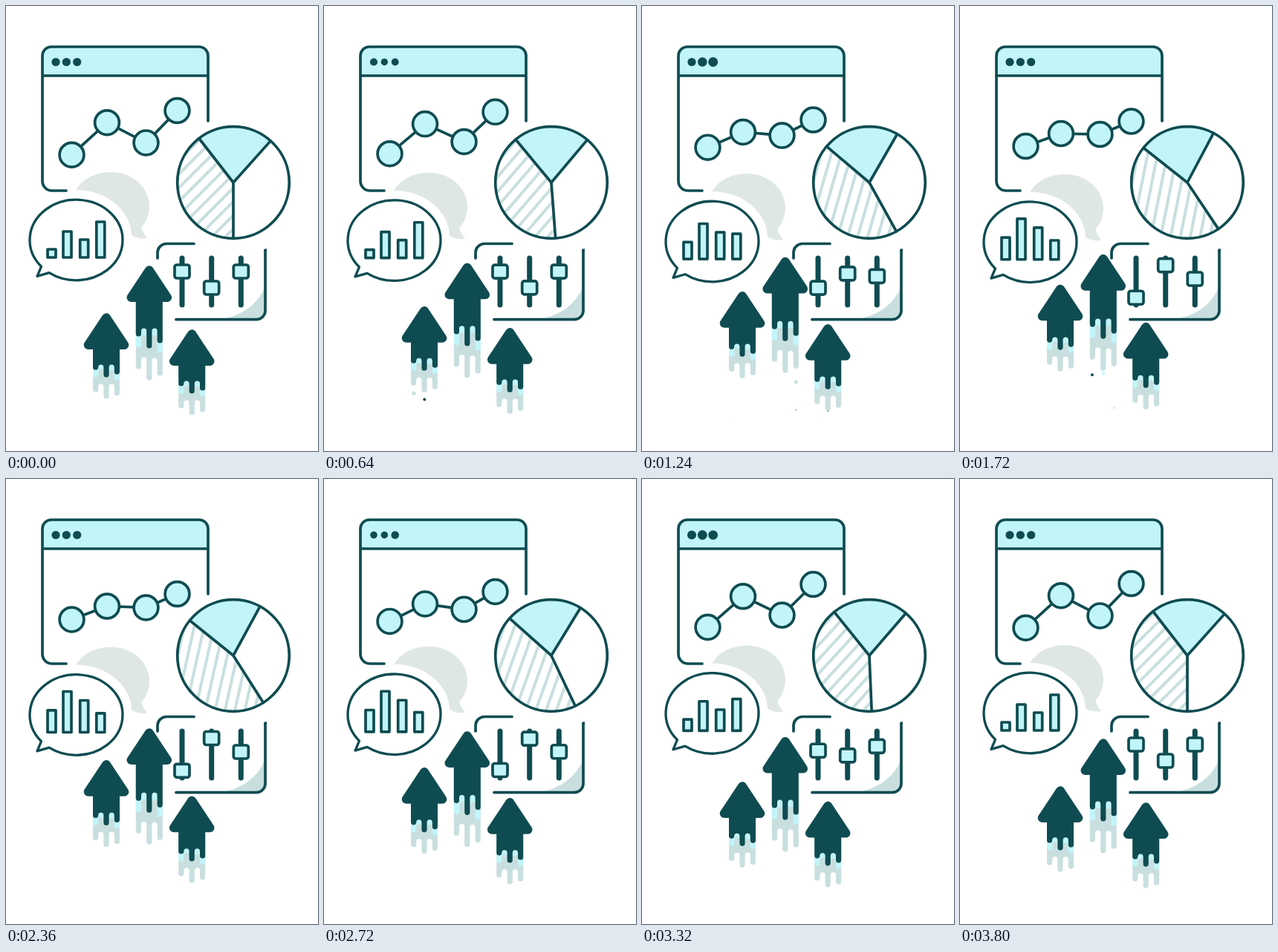
An HTML page with a canvas that plays this animation: 420x600 px, repeating every 3840 ms.

```html
<!DOCTYPE html>
<html lang="en">
<head>
<meta charset="utf-8">
<style>
  html, body { margin: 0; width: 100%; height: 100%; overflow: hidden; background: #fff; }
  canvas { display: block; }
</style>
</head>
<body>
<canvas id="stage" width="420" height="600"></canvas>
<script>
const ctx = document.getElementById('stage').getContext('2d');
const LOOP = 3840, RAD = Math.PI / 180;
const DARK = '#0f4c51', CYAN = '#c2f5fa', PALE = '#c9dfdf', GHOST = '#dfe7e6', WHITE = '#fff';

const mix = (a, b, k) => a + (b - a) * k;
const clamp = v => Math.min(1, Math.max(0, v));

// Symmetric cubic-bezier(a, 0, 1 - a, 1)
function ease(x, a) {
  let lo = 0, hi = 1, s = 0.5;
  for (let i = 0; i < 20; i++) {
    s = (lo + hi) / 2;
    const bx = 3 * a * s * (1 - s) ** 2 + 3 * (1 - a) * s * s * (1 - s) + s ** 3;
    if (bx < x) lo = s; else hi = s;
  }
  return s * s * (3 - 2 * s);
}

function paint(path, fill, stroke, width = 3.7) {
  if (fill) { ctx.fillStyle = fill; ctx.fill(path); }
  if (stroke) { ctx.strokeStyle = stroke; ctx.lineWidth = width; ctx.stroke(path); }
}
const draw = (d, fill, stroke, width) => paint(new Path2D(d), fill, stroke, width);

function disc(x, y, r, fill, stroke) {
  const p = new Path2D();
  p.arc(x, y, r, 0, 2 * Math.PI);
  paint(p, fill, stroke);
}

function box(x, y, w, h, r) {
  const p = new Path2D();
  p.roundRect(x, y, w, h, r);
  paint(p, CYAN, DARK);
}

function drawWindow(t, k) {
  draw('M49 94V67A12 12 0 0 1 61 55H260A12 12 0 0 1 272 67V94Z', CYAN);
  draw('M272 155V67A12 12 0 0 0 260 55H61A12 12 0 0 0 49 67V236A13 13 0 0 0 62 249H81M49 94H272', null, DARK);
  [67, 81.3, 95.7].forEach((x, i) => {
    let r = 5.6;
    for (const start of [240, 2400]) {
      r -= 0.9 * Math.sin(2 * Math.PI * clamp((t - start - i * 130) / 1000));
    }
    disc(x, 75.5, r, DARK);
  });
  const nodes = [[88.5, 200.7, 188.9], [136, 157.2, 172.2], [188.5, 184.4, 172.9], [230.5, 141, 155.7]]
    .map(([x, a, b]) => [x, mix(a, b, k)]);
  draw('M' + nodes.join('L'), null, DARK);
  for (const [x, y] of nodes) disc(x, y, 16.4, CYAN, DARK);
}

function drawPie(k) {
  const R = 75.3, down = (90 - 34 * k) * RAD, left = (232.2 - 14 * k) * RAD, right = (311.8 - 14 * k) * RAD;
  const wedge = (from, to) => {
    const p = new Path2D('M0 0');
    p.arc(0, 0, R, from, to);
    p.closePath();
    return p;
  };
  ctx.save();
  ctx.translate(306, 238);
  disc(0, 0, R, WHITE);
  ctx.save();
  ctx.clip(wedge(down, left));
  ctx.rotate((-45 - 34 * k) * RAD);
  for (let i = -6; i < 8; i++) draw(`M-80 ${13 * i - 7.8}H80`, null, PALE, 4);
  ctx.restore();
  paint(wedge(left, right), CYAN);
  for (const a of [down, left, right]) draw(`M0 0L${R * Math.cos(a)} ${R * Math.sin(a)}`, null, DARK);
  disc(0, 0, R, null, DARK);
  ctx.restore();
}

function drawBubbles(level, shift) {
  ctx.save();
  ctx.translate(0, shift);
  draw('M94 248C104 232 121 224 141 224C171 224 193 245 193 270C193 281 189 291 182 299Q185 307 190 313Q179 315 169 309C169 280 140 248 94 248Z', GHOST);
  const bubble = new Path2D();
  bubble.ellipse(94.5, 315.5, 62.5, 54.3, 0, 138.8 * RAD, 485.6 * RAD);
  bubble.lineTo(42, 364.3);
  bubble.closePath();
  paint(bubble, WHITE, DARK, 3.3);
  [[56, 11, 29.7], [77, 35, 55], [99.7, 24, 43], [121.8, 48, 25.7]].forEach(([x, a, b]) => {
    const h = mix(a, b, level);
    box(x, 339 - h, 11, h, 0);
  });
  ctx.restore();
}

function drawPanel(level) {
  draw('M349 378V411A12 12 0 0 1 337 423H286Q333 416 349 378Z', PALE);
  draw('M204 340V332A12 12 0 0 1 216 320.5H253M229 422.7H337A12 12 0 0 0 349 411V329', null, DARK);
  draw('M347.1 329.5L350.9 327V331H347.1Z', DARK);
  [[237, 358, 393.3], [276.7, 380, 349.5], [316.3, 358, 368]].forEach(([x, a, b]) => {
    draw(`M${x} 340V403`, null, DARK, 7);
    box(x - 10, mix(a, b, level) - 9, 20, 18, 3);
  });
}

// Five columns: even ones hang with round ends, odd ones are round notches.
function drips(ends, stretch, color) {
  const p = new Path2D('M-18 40'), w = 7.2;
  ends.forEach((y, i) => p.arc(w * (i - 2), y + stretch, w / 2, Math.PI, 0, i % 2 === 0));
  p.lineTo(18, 40);
  paint(p, color);
}

const SHORT = [[103, 99, 112, 99, 108], [83, 79, 83, 80, 87], [73, 73, 83, 73, 79]];
const LONG = [[136, 127, 151, 128, 145], [107, 97, 107, 97, 114], [92, 88, 108, 88, 101]];

function drawArrow(x, y, layers, stretch) {
  ctx.save();
  ctx.translate(x, y);
  layers.forEach((ends, i) => drips(ends, stretch, [PALE, CYAN, DARK][i]));
  draw('M0 6.3L24.3 43H-24.3Z', DARK, DARK, 12);
  ctx.restore();
}

// x, start y, fall, start time, duration, color
const DROPS = [
  [207.5, 448, 104, 284, 1006, DARK],
  [178, 436, 127, 860, 1400, DARK],
  [207.5, 490.6, 67, 819, 1079, PALE],
  [193, 476, 70, 1300, 1000, CYAN],
  [135.3, 497, 70, 152, 800, DARK],
  [121, 512, 48, 300, 960, PALE],
  [250.3, 515, 36, 520, 800, DARK],
  [236, 535, 20, 500, 760, PALE]
];

function drawDrops(t) {
  for (const [x, y, fall, start, span, color] of DROPS) {
    const u = (t - start) / span;
    if (u > 0 && u < 1) disc(x, y + fall * u ** 1.5, 3.2 * Math.sqrt(1 - u), color);
  }
}

function render(now) {
  const t = now % LOOP, swing = 1 - Math.abs(2 * t / LOOP - 1);
  const sharp = ease(swing, 0.72), soft = ease(swing, 0.42);
  const level = ease(clamp((t - 570) / 1200), 0.55) - ease(clamp((t - 2560) / 1200), 0.55);
  ctx.fillStyle = WHITE;
  ctx.fillRect(0, 0, 420, 600);
  ctx.lineCap = ctx.lineJoin = 'round';
  drawWindow(t, sharp);
  drawBubbles(level, 2.8 * soft);
  drawPie(sharp);
  drawPanel(level);
  drawDrops(t);
  drawArrow(135, 414 - 39.5 * soft, SHORT, 1.8 * soft);
  drawArrow(192.8, 350 - 15.7 * soft, LONG, 2.5 * soft);
  drawArrow(250.2, 436 - 9.7 * soft, SHORT, 1.8 * soft);
}

const origin = performance.now();
function tick() {
  render(performance.now() - origin);
  requestAnimationFrame(tick);
}
tick();
</script>
</body>
</html>
```
